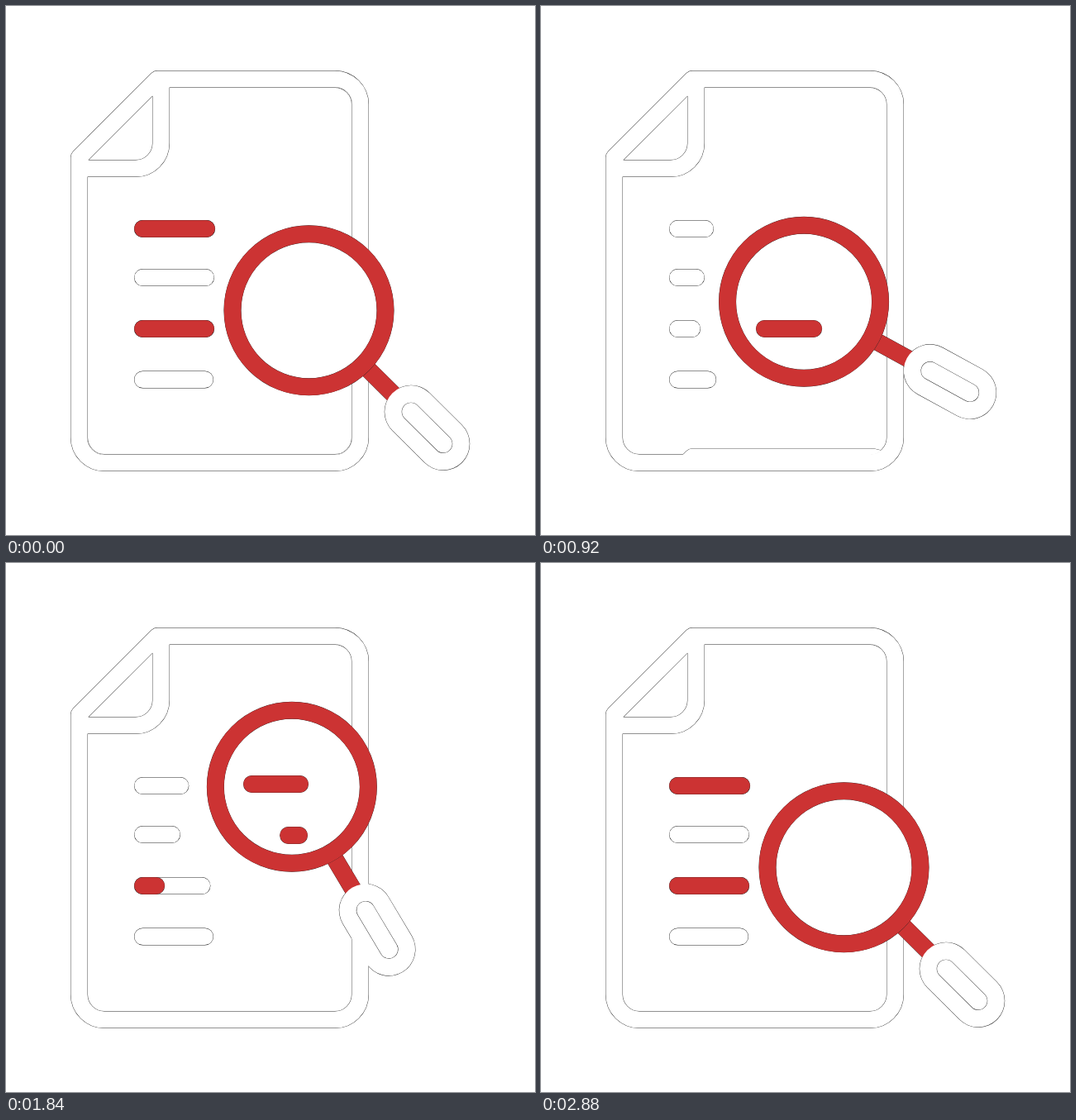
Recreate the animation shown at these times as an HTML page with a canvas. Size 640 by 640 pixels, loop 3 s.

```html
<!DOCTYPE html>
<html lang="en">
<head>
<meta charset="utf-8">
<title>Document search</title>
<style>
  html, body { margin: 0; width: 100%; height: 100%; overflow: hidden; background: #fff; }
  canvas { display: block; }
</style>
</head>
<body>
<canvas id="stage" width="640" height="640"></canvas>
<script>
const ctx = document.getElementById('stage').getContext('2d');
const LOOP = 3000, RED = '#cc3333', WHITE = '#fff', EDGE = '#222';
const LINE = 21, GRIP = 64.5, HAIR = 0.8, RED_HAIR = 0.4;
const SLIDE = 485, SWEEP = 400;

const sheet = new Path2D('M88.5 183.2L183.2 88.5H398A30.5 30.5 0 0 1 428.5 119V522A30.5 30.5 0 0 1 398 552.5H119A30.5 30.5 0 0 1 88.5 522Z');
const frame = new Path2D(sheet);
frame.addPath(new Path2D('M88.5 196.5H157A30.5 30.5 0 0 0 187.5 166V88.5'));
const inside = new Path2D('M98 98H398A21 21 0 0 1 419 119V522A21 21 0 0 1 398 543H119A21 21 0 0 1 98 522Z');

// A row appears as a stub, then grows to its full width; some rows are then filled in red.
const rows = [
  { y: 269.5, full: 98, stub: 54, done: 2660, bend: 2, fill: [2000, 2460] },
  { y: 328.5, full: 97, stub: 43, done: 2400, bend: 3 },
  { y: 390.5, full: 97, stub: 38, done: 1900, bend: 1.3, fill: [1730, 2020] },
  { y: 452, full: 96, stub: 57, done: 1320, bend: 1 }
];

// Red bars seen through the lens: each grows from the left, then is wiped from the left.
const finds = [
  { y: 267.5, left: 287, right: 366, grow: 1408, wipe: 2126 },
  { y: 329.5, left: 261, right: 365, grow: 1140, wipe: 1571 },
  { y: 390.5, left: 260, right: 365, grow: 616, wipe: 1252 }
];

const home = { x: 366.5, y: 368.3, angle: 44.8 };
const low = { x: 313.8, y: 356.8, angle: 27.3 };
const high = { x: 346.7, y: 268.5, angle: 60 };

const mix = (a, b, u) => a + (b - a) * u;
const progress = (t, start, end) => Math.min(1, Math.max(0, (t - start) / (end - start)));
const cubic = u => u < 0.5 ? 4 * u ** 3 : 1 - 4 * (1 - u) ** 3;

function lensPose(t) {
  const [from, to, start, end] =
    t < 1145 ? [home, low, 385, 1122] :
    t < 2000 ? [low, high, 1145, 2000] : [high, home, 2000, 2780];
  const u = cubic(progress(t, start, end));
  return {
    x: mix(from.x, to.x, u),
    y: mix(from.y, to.y, u),
    angle: mix(from.angle, to.angle, u)
  };
}

function stroke(path, color, width) {
  ctx.strokeStyle = color;
  ctx.lineWidth = width;
  ctx.stroke(path);
}

function edged(path, color, width = LINE) {
  stroke(path, EDGE, width);
  stroke(path, color, width - (color === RED ? RED_HAIR : HAIR));
}

function segment(x0, x1, y) {
  const path = new Path2D();
  path.moveTo(x0, y);
  path.lineTo(x1, y);
  return path;
}

function pill(x0, x1, y, color) {
  const width = Math.min(LINE, x1 - x0);
  if (width > 2) edged(segment(x0 + width / 2, x1 - width / 2 + 0.01, y), color, width);
}

function drawRow(row, white, red) {
  pill(155, 155 + white, row.y, WHITE);
  pill(155, 155 + red, row.y, RED);
}

function drawGrowingRow(row, t) {
  const white = row.stub * progress(t, 700, 920) +
    (row.full - row.stub) * progress(t, 920, row.done) ** row.bend;
  drawRow(row, white, row.fill ? row.full * progress(t, ...row.fill) : 0);
}

function onSlidingSheet(dy, draw) {
  ctx.save();
  ctx.clip(inside);
  ctx.translate(0, dy);
  draw();
  ctx.restore();
}

function drawSlidingSheet() {
  ctx.fillStyle = WHITE;
  ctx.fill(sheet);
  ctx.save();
  ctx.clip(sheet);
  stroke(frame, EDGE, LINE);
  ctx.restore();
  stroke(frame, WHITE, LINE - HAIR);
  for (const row of rows) drawRow(row, row.full, row.fill ? row.full : 0);
}

// Page frame and grip share one outline, so all edges come before the white.
function drawPages(t, grip) {
  const dy = SLIDE * cubic(progress(t, 285, 1125));
  stroke(frame, EDGE, LINE);
  stroke(grip, EDGE, GRIP);
  for (const row of rows) drawGrowingRow(row, t);
  if (dy < SLIDE) onSlidingSheet(dy, () => stroke(sheet, EDGE, LINE));
  stroke(frame, WHITE, LINE - HAIR);
  if (dy < SLIDE) onSlidingSheet(dy, drawSlidingSheet);
}

function drawLens(t, x, y, neck, grip) {
  const ring = new Path2D();
  ring.arc(x, y, 92.5, 0, 2 * Math.PI);

  edged(neck, RED);
  stroke(grip, WHITE, GRIP - HAIR);
  edged(grip, WHITE, 22.5);

  ctx.fillStyle = WHITE;
  ctx.fill(ring);
  ctx.save();
  ctx.clip(ring);
  for (const { y, left, right, grow, wipe } of finds) {
    pill(mix(left, right, progress(t, wipe, wipe + SWEEP)),
         mix(left, right, progress(t, grow, grow + SWEEP)), y, RED);
  }
  ctx.restore();
  edged(ring, RED);
}

function draw(now) {
  const t = now % LOOP;
  const { x, y, angle } = lensPose(t);
  const place = new DOMMatrix().translate(x, y).rotate(angle);
  const handle = (from, to) => {
    const path = new Path2D();
    path.addPath(segment(from, to, 0), place);
    return path;
  };
  const grip = handle(174, 229);

  ctx.fillStyle = WHITE;
  ctx.fillRect(0, 0, 640, 640);
  ctx.lineCap = ctx.lineJoin = 'round';
  drawPages(t, grip);
  drawLens(t, x, y, handle(98, 150), grip);
  requestAnimationFrame(draw);
}

requestAnimationFrame(draw);
</script>
</body>
</html>
```
